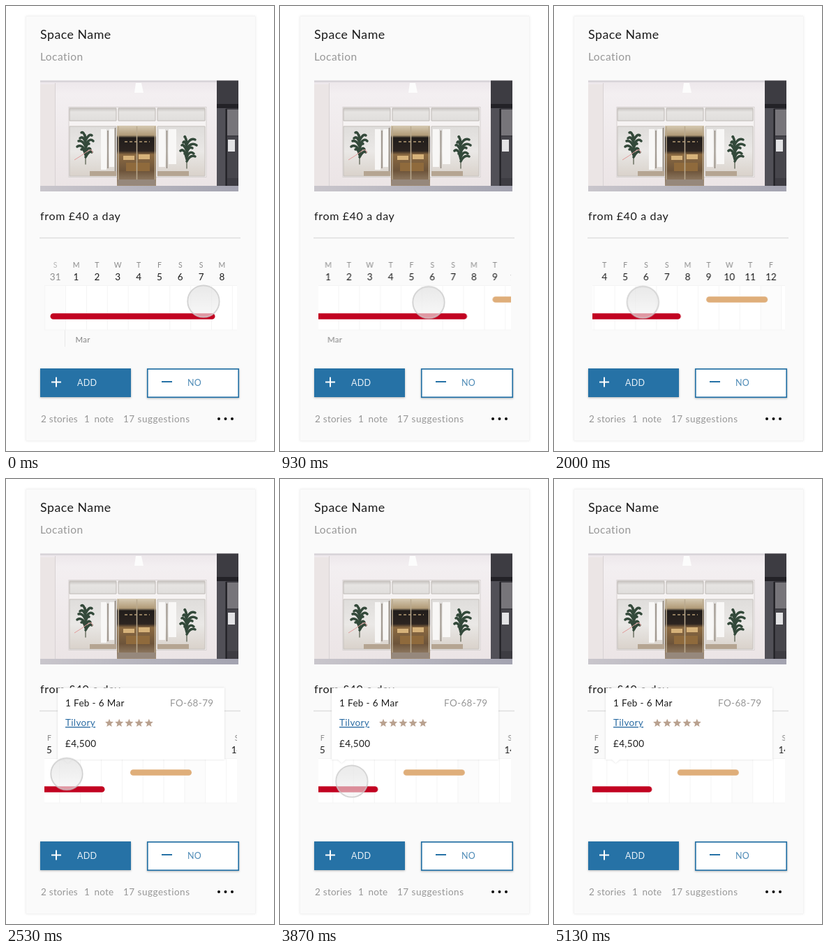
An HTML page that plays this animation: 384 px wide and 636 px high, repeating every 5.19 s.

```html
<!DOCTYPE html>
<html lang="en">
<head>
<meta charset="utf-8">
<title>Space card</title>
<style>
html, body { margin: 0; width: 100%; height: 100%; overflow: hidden; background: #fff; }
svg { display: block; width: 384px; height: 636px; font-family: Lato, "Open Sans", sans-serif; }
text { fill: #1c1c1c; }
.grey { fill: #979797; }
.title { font-size: 17.8px; letter-spacing: .5px; }
.place { font-size: 15.5px; letter-spacing: .45px; }
.price { font-size: 16px; letter-spacing: .65px; }
.foot { font-size: 13.5px; letter-spacing: .25px; }
.wide { letter-spacing: .5px; }
.btn { font-size: 12.5px; letter-spacing: .3px; }
.info { font-size: 13.5px; letter-spacing: .35px; }
.link { fill: #2b6ca3; text-decoration: underline; }
.week { font-size: 10.5px; fill: #8a8a8a; text-anchor: middle; }
.num { font-size: 13.5px; text-anchor: middle; }
.off { fill: #b5b5b5; }
.num.off { fill: #8d8d8d; }
.month { font-size: 11.5px; letter-spacing: .3px; fill: #858585; }
.card { filter: drop-shadow(0 0 1.5px #0001); }
.raised { filter: drop-shadow(0 1px 1.5px #0004); }
.popup { filter: drop-shadow(0 0 1.5px #0002); }

.strip, .finger, .popup { animation: 5190ms linear infinite; }
.strip { animation-name: scroll; }
.finger { animation-name: touch; }
.popup { animation-name: reveal; }

/* The strip follows the finger once it has reached x = 245. */
@keyframes scroll {
  0%, 9.73% { transform: translateX(0); }
  17.92% { transform: translateX(-31.5px); }
  29.48% { transform: translateX(-66.5px); }
  45.3% { transform: translateX(-156px); }
  48.75% { transform: translateX(-158px); }
  55%, 100% { transform: translateX(-159.2px); }
}
@keyframes touch {
  0% { transform: translate(283px, 422px); }
  9.73% { transform: translate(245px, 423px); }
  17.92% { transform: translate(213px, 423.5px); }
  29.48% { transform: translate(179px, 425px); }
  45.3% { transform: translate(89px, 422px); }
  48.75% { transform: translate(87px, 421.5px); }
  55%, 73.6% { transform: translate(86px, 421.5px); opacity: 1; }
  83.43% { transform: translate(254px, 526px); opacity: .6; }
  91%, 100% { transform: translate(288px, 664px); opacity: .6; }
}
@keyframes reveal {
  0%, 46% { opacity: 0; }
  47.8%, 100% { opacity: 1; }
}
</style>
</head>
<body>
<svg viewBox="0 0 384 636">
  <defs>
    <clipPath id="window"><rect x="55" y="355" width="276" height="135"/></clipPath>
    <clipPath id="frame"><rect x="49" y="106.500" width="284" height="158.500"/></clipPath>
    <linearGradient id="wall" x2="0" y2="1">
      <stop stop-color="#ece6ea"/><stop offset=".12" stop-color="#f3eff1"/><stop offset="1" stop-color="#ebe4e5"/>
    </linearGradient>
    <linearGradient id="transom" x2="0" y2="1">
      <stop stop-color="#c8c4c1"/><stop offset=".3" stop-color="#e6e4e2"/><stop offset="1" stop-color="#e0dedc"/>
    </linearGradient>
    <linearGradient id="glass" x2="0" y2="1">
      <stop stop-color="#dfdddb"/><stop offset=".5" stop-color="#eae8e6"/><stop offset="1" stop-color="#d9d2cb"/>
    </linearGradient>
    <linearGradient id="room" x2="0" y2="1">
      <stop stop-color="#d5c9b2"/><stop offset=".16" stop-color="#b19b78"/><stop offset=".2" stop-color="#211d1b"/>
      <stop offset=".42" stop-color="#2c2420"/><stop offset=".48" stop-color="#8b6a42"/>
      <stop offset=".75" stop-color="#6d543a"/><stop offset="1" stop-color="#a08c76"/>
    </linearGradient>
    <linearGradient id="path">
      <stop stop-color="#c9c6cc"/><stop offset="1" stop-color="#a3a3b0"/>
    </linearGradient>
    <linearGradient id="tip" x2="0" y2="1">
      <stop stop-color="#dcdcdc" stop-opacity=".62"/><stop offset="1" stop-color="#f5f5f5" stop-opacity=".62"/>
    </linearGradient>
  </defs>

  <rect class="card" x="28.500" y="14.500" width="329" height="607" rx="1" fill="#fafafa" stroke="#f3f3f3"/>
  <text class="title" x="49" y="47">Space Name</text>
  <text class="place grey" x="49" y="78">Location</text>

  <g clip-path="url(#frame)">
    <rect x="49" y="106" width="284" height="159" fill="url(#wall)"/>
    <path d="M49 106H302V109H49Z" fill="#d8d4d9"/>
    <path d="M49 112H70V257H49Z" fill="#ebe5e5"/>
    <path d="M70.500 110V257" stroke="#d8d2d3"/>
    <path d="M184 124l2-14h8l3 14z" fill="#fcfcfc"/>
    <rect x="90" y="144.500" width="197" height="100" fill="#f6f3f3" stroke="#d5d0cf"/>
    <path d="M91 146H158V164H91ZM161 146H214V164H161ZM217 146H285V164H217Z" fill="url(#transom)" stroke="#bdb8b4"/>
    <path d="M91 172H158V243H91ZM217 172H285V243H217Z" fill="url(#glass)" stroke="#c4bfbb"/>
    <path d="M136 176H144V234H136ZM148 176H155V230H148ZM219 176H228V230H219ZM233 176H244V226H233Z" fill="#f8f7f6"/>
    <path d="M146 178V232M156.500 174V236M230.500 178V232" stroke="#8e857b" stroke-width="1.500"/>
    <path d="M120 236H158V243H120ZM217 236H262V243H217Z" fill="#b5a592"/>
    <rect x="159" y="171" width="56" height="86" fill="url(#room)"/>
    <path d="M170 194H206" stroke="#b59a74" stroke-dasharray="4 3" stroke-width="1.500"/>
    <path d="M168 214H184V220H168ZM190 212H206V219H190Z" fill="#d6b27a"/>
    <path d="M172 224H206V236H172Z" fill="#8f6a3c"/>
    <path d="M161 172V255M187.500 172V248M213.500 172V255" stroke="#b8a88f" stroke-width="1.500"/>
    <path d="M160 248H214V256H160Z" fill="#96887c"/>
    <g id="plants" fill="none" stroke="#33493a" stroke-linecap="round" stroke-width="3.500"/>
    <path d="M98 220q10-6 18-12t8 2" fill="none" stroke="#e29a9a"/>
    <path d="M49 257H333V265H49Z" fill="url(#path)"/>
    <rect x="302" y="106" width="31" height="151" fill="#3d3c42"/>
    <path d="M302 140H333V146H302Z" fill="#232227"/>
    <path d="M302 146H315V257H302Z" fill="#515057"/>
    <path d="M317 148H333V185H317Z" fill="#77757a"/>
    <path d="M317 187H333V246H317Z" fill="#47464c"/>
    <path d="M318 191H328V208H318Z" fill="#e3e3e5"/>
    <path d="M315.500 147V257" stroke="#1f1e23" stroke-width="2"/>
  </g>

  <text class="price" x="49" y="306">from £40 a day</text>
  <path d="M48 331.500H336" stroke="#dedede" stroke-width="1.500"/>

  <rect x="55" y="399.500" width="276" height="63.500" fill="#fff"/>
  <g clip-path="url(#window)">
    <g class="strip">
      <g id="days"></g>
      <path d="M84.500 463V487" stroke="#e9e9e9"/>
      <text class="month" x="99.500" y="481">Mar</text>
      <rect x="63.500" y="439.200" width="236" height="8.600" rx="4.300" fill="#c20321"/>
      <rect x="336" y="415.200" width="88" height="8.600" rx="4.300" fill="#dfae7a"/>
    </g>
  </g>
  <path d="M55 399.500H331M55 463H331" stroke="#f4f4f4"/>

  <rect class="raised" x="49" y="518" width="130" height="41" fill="#2672a6"/>
  <path d="M65 537.500H79M72 530.500V544.500" stroke="#fff" stroke-width="2"/>
  <text class="btn" x="102" y="542.500" style="fill:#e6f0f7">ADD</text>
  <rect class="raised" x="202.800" y="518.800" width="130.400" height="40.400" fill="#fff" stroke="#2672a6" stroke-width="1.700"/>
  <path d="M223 537H238" stroke="#2672a6" stroke-width="2"/>
  <text class="btn" x="260" y="542.500" style="fill:#4f8cb7">NO</text>

  <text class="foot grey" x="50" y="595">2 stories</text>
  <text class="foot grey" x="112" y="595">1</text>
  <text class="foot grey" x="126.500" y="595">note</text>
  <text class="foot grey wide" x="168" y="595">17 suggestions</text>
  <g fill="#080808"><circle cx="305" cy="590" r="2"/><circle cx="314.500" cy="590" r="2"/><circle cx="324" cy="590" r="2"/></g>

  <g class="popup">
    <path d="M74 298.500H313V401H94L88.500 406L83 401H74Z" fill="#fff"/>
    <text class="info" x="85" y="325">1 Feb - 6 Mar</text>
    <text class="info grey" x="235" y="325">FO-68-79</text>
    <text class="info link" x="85" y="353">Tilvory</text>
    <g id="stars" fill="#b9a18f"></g>
    <text class="info" x="85" y="382.500">£4,500</text>
  </g>

  <circle class="finger" r="22.700" fill="url(#tip)" stroke="#cacaca" stroke-opacity=".85" stroke-width="1.800"/>
</svg>
<script>
const STEP = 29.85, FIRST = 100.5;
const fill = (id, html) => { document.getElementById(id).innerHTML = html; };
const range = (n, draw) => Array.from({ length: n }, (_, i) => draw(i)).join('');

// Day 0 is the last day of the previous month.
fill('days', range(17, d => {
  const x = FIRST + (d - 1) * STEP, left = x - STEP / 2;
  const off = d ? '' : ' off';
  const shade = d === 0 || d === 12
    ? `<rect x="${left}" y="400" width="${STEP}" height="63" fill="#fcfcfc"/>` : '';
  return `${shade}<path d="M${left} 400V463" stroke="#f4f4f4"/>
    <text class="week${off}" x="${x}" y="374">${'SMTWTFS'[d % 7]}</text>
    <text class="num${off}" x="${x}" y="392">${d || 31}</text>`;
}));

const star = (cx, cy, r) => range(10, i => {
  const a = i * Math.PI / 5 - Math.PI / 2, k = i % 2 ? r * 0.45 : r;
  return `${cx + k * Math.cos(a)},${cy + k * Math.sin(a)} `;
});
fill('stars', range(5, i => `<polygon points="${star(148 + i * 14.2, 349, 6.3)}"/>`));

const plant = (x, y, lean) => `<path d="M${x} ${y + 42}V${y}" stroke="#6d7263" stroke-width="1.5"/>` +
  range(10, i => {
    const side = i % 2 ? 1 : -1, top = y + i * 3, reach = 5 + (i * 5) % 8;
    return `<path d="M${x} ${top + 5}q${side * reach / 2} -10 ${side * reach + lean} -${8 - i % 4}"/>`;
  });
fill('plants', plant(114, 184, -1) + plant(259, 190, 2));
</script>
</body>
</html>
```
